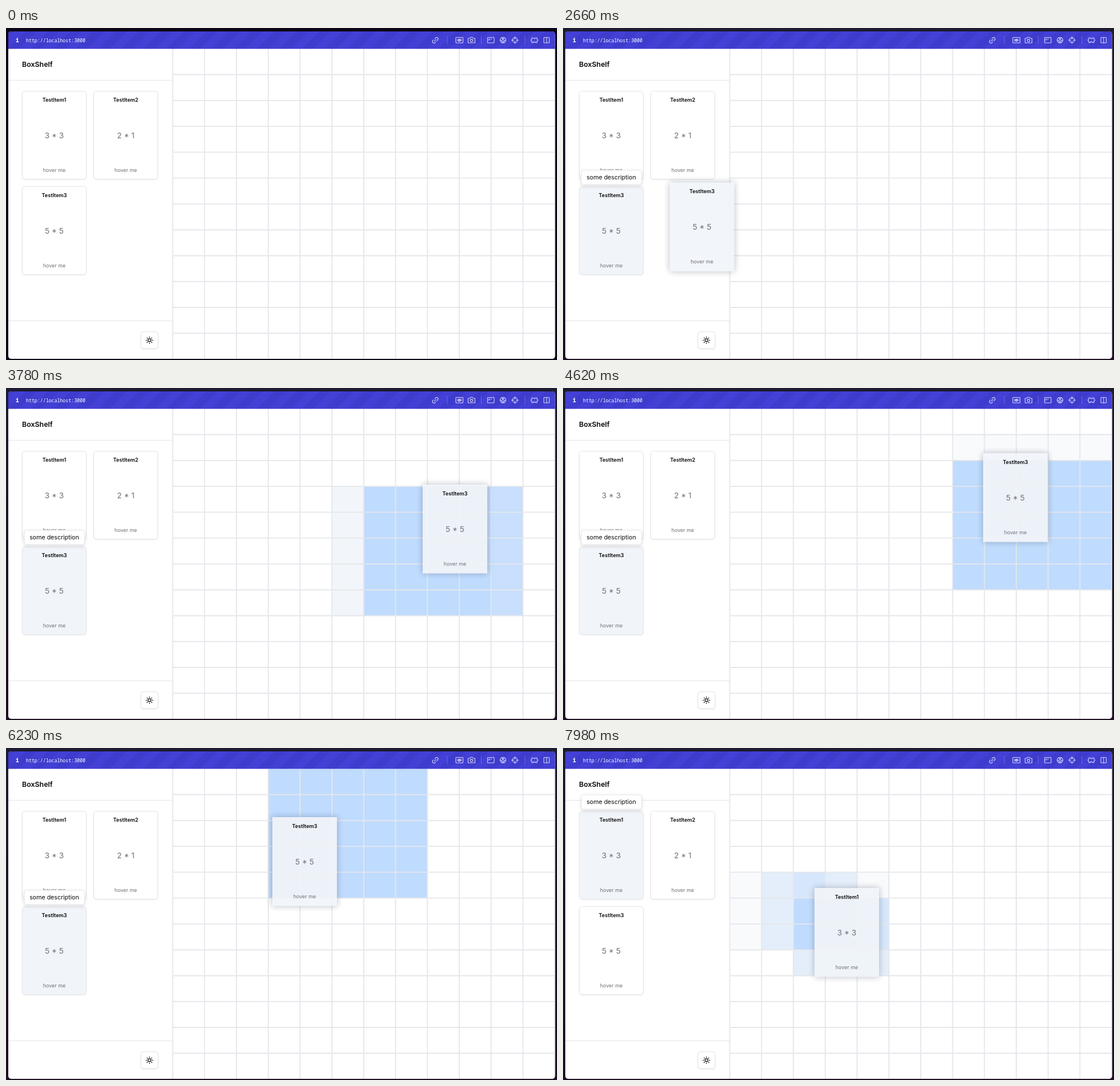
An HTML page for the animation above (8000 ms loop, 964 by 581 pixels).

```html
<!DOCTYPE html>
<html lang="en">
<head>
<meta charset="utf-8">
<title>BoxShelf</title>
<style>
html, body { margin: 0; width: 100%; height: 100%; overflow: hidden; background: #0c0714; }
svg { display: block; width: 964px; height: 581px; font-family: Inter, sans-serif; }
.mid { text-anchor: middle; }
.name { font-size: 9.1px; font-weight: 600; fill: #09090b; }
.size { font-size: 13.7px; fill: #71717a; }
.hint { font-size: 9px; fill: #71717a; }
.tip { font-size: 10.6px; fill: #09090b; }
.mono { font-family: "Noto Sans Mono", monospace; fill: #fff; }
.icons { fill: none; stroke: #d3d3fa; stroke-width: 1.1; stroke-linecap: round; stroke-linejoin: round; }
.soft { filter: drop-shadow(0 1px 1px rgba(0,0,0,.07)); }
.lift { filter: drop-shadow(0 0 6px rgba(15,23,42,.3)); }
.pop { filter: drop-shadow(0 2px 3px rgba(0,0,0,.13)); }
</style>
</head>
<body>
<svg id="stage" viewBox="0 0 964 581">
  <defs>
    <linearGradient id="desk" x2="0" y2="1">
      <stop stop-color="#1d1c30"/><stop offset="1" stop-color="#1d1022"/>
    </linearGradient>
    <pattern id="stripes" width="28" height="28" patternUnits="userSpaceOnUse" patternTransform="rotate(45)">
      <rect width="28" height="28" fill="#4340d5"/><rect width="14" height="28" fill="#3e3ccd"/>
    </pattern>
    <clipPath id="win"><rect x="4" y="6" width="956.5" height="573" rx="5"/></clipPath>
  </defs>
  <rect width="964" height="581" fill="#0c0714"/>
  <rect id="backdrop" width="964" height="581" fill="url(#desk)"/>
  <g clip-path="url(#win)">
    <rect x="4" y="6" width="957" height="573" fill="#fff"/>
    <g id="cells"></g>
    <path id="lines" stroke="#e5e7eb" stroke-width="1.9" fill="none"/>
    <path d="M4 91.5H291M4 512.5H291" stroke="#e4e4e7"/>
    <rect x="4" y="6" width="957" height="30.5" fill="url(#stripes)"/>
    <text class="mono mid" x="20" y="25" font-size="10.5" font-weight="700">i</text>
    <text class="mono" x="35" y="24.5" font-size="8.25">http://localhost:3000</text>
    <path d="M772 14v14M831.5 14v14M908 14v14" stroke="#6a69e2"/>
    <g class="icons">
      <g transform="rotate(-45 751 21.5)">
        <path d="M749.5 18.8h-1.7a2.7 2.7 0 0 0 0 5.4h1.7M752.5 18.8h1.7a2.7 2.7 0 0 1 0 5.4h-1.7M748.7 21.5h4.6"/>
      </g>
      <rect x="787" y="16.5" width="12.5" height="9.5" rx="1"/>
      <path d="M789.5 21.2q3.7-4 7.4 0q-3.7 4-7.4 0"/><circle cx="793.2" cy="21.2" r="1"/>
      <path d="M808.5 18h3l1.2-1.8h3.6l1.2 1.8h3v8h-12z"/><circle cx="814.5" cy="21.8" r="2.2"/>
      <rect x="842.5" y="16.5" width="11.5" height="9.5" rx="1"/><path d="M844.7 19l1.5 1.2-1.5 1.2M847.8 19h1.5"/>
      <circle cx="869.5" cy="21.2" r="5"/>
      <path d="M867 17l2.5 2 2.5-2M865 22l2.5-.5 1 3-1 1.5M874 22l-2.5-.5-1 3 1 1.5M869.5 19l-2 2.5M869.5 19l2 2.5M868.5 24.5h2"/>
      <circle cx="890.5" cy="21.2" r="4.3"/><path d="M890.5 15.2v4M890.5 23.2v4M884.5 21.2h4M892.5 21.2h4"/>
      <path d="M920 17.2h3a1.5 1.5 0 0 0 3 0h3v2.5a1.6 1.6 0 0 1 0 3.2v2.5h-3a1.5 1.5 0 0 0-3 0h-3v-2.5a1.6 1.6 0 0 1 0-3.2z"/>
      <rect x="941" y="16.5" width="9.5" height="9.5" rx="1"/><path d="M945.8 16.5v9.5"/>
    </g>
    <text x="28" y="68" font-size="12.4" font-weight="600" fill="#09090b">BoxShelf</text>
    <g id="shelf"></g>
    <rect class="soft" x="236" y="531.5" width="30" height="29.5" rx="4" fill="#fff" stroke="#e4e4e7"/>
    <g id="sun" fill="none" stroke="#09090b" stroke-width="1.2" stroke-linecap="round"><circle cx="251" cy="546.3" r="2.6"/></g>
    <g id="tips"></g>
    <g id="drag"></g>
  </g>
</svg>
<script>
const LOOP = 8000, STEP = 70;
const COLS = 12, ROWS = 12, CW = 55.7, CH = 45.27, GX = 291.9, GY = 36.5;
const GRAB = [60.5, 100.5];
const BLUE = [191, 219, 254], SLATE = [241, 245, 249], WHITE = [255, 255, 255];
const $ = id => document.getElementById(id);

function add(parent, tag, attrs, text) {
  const el = document.createElementNS("http://www.w3.org/2000/svg", tag);
  for (const k in attrs) el.setAttribute(k, attrs[k]);
  if (text) el.textContent = text;
  return parent.appendChild(el);
}
const clamp = (v, lo = 0, hi = 1) => Math.min(hi, Math.max(lo, v));
const mix = (a, b, k) => `rgb(${a.map((v, i) => Math.round(v + (b[i] - v) * k))})`;

const items = [
  { name: "TestItem1", size: "3 * 3", x: 28, y: 110 },
  { name: "TestItem2", size: "2 * 1", x: 153, y: 110 },
  { name: "TestItem3", size: "5 * 5", x: 28, y: 277 }
];

// Drags: time, left, top of the carried card
const drags = [
  { item: items[2], reach: 2, hold: 6090, drop: 6230, end: 6510, keys: [
    [2380, 28, 277], [2520, 60, 275], [2730, 250, 268], [2870, 380, 260], [2955, 437, 252],
    [2990, 455, 249], [3080, 472, 246], [3220, 488, 244], [3500, 600, 212], [3670, 677, 186],
    [3780, 729, 169], [3990, 743, 147], [4340, 743, 143], [4480, 741, 140], [4620, 735, 114],
    [4900, 742, 72], [5250, 744, 52], [5390, 730, 52], [5740, 610, 56], [6090, 515, 64],
    [6160, 512, 66], [6230, 466, 121], [6300, 300, 190], [6370, 140, 246], [6440, 60, 270], [6510, 28, 277]] },
  { item: items[0], reach: 1, hold: LOOP, drop: LOOP, end: LOOP, keys: [
    [7630, 28, 110], [7700, 80, 122], [7770, 230, 160], [7840, 345, 185], [7900, 396, 205], [7980, 440, 245]] }
];

function place(keys, t) {
  let i = 1;
  while (i < keys.length - 1 && keys[i][0] < t) i++;
  const [a, b] = [keys[i - 1], keys[i]];
  const k = clamp((t - a[0]) / (b[0] - a[0]));
  return [a[1] + (b[1] - a[1]) * k, a[2] + (b[2] - a[2]) * k];
}

function drawCard(parent, item, carried) {
  const g = add(parent, "g", { transform: `translate(${item.x} ${item.y})` });
  const box = add(g, "rect", carried
    ? { class: "lift", width: 113, height: 155.5, fill: "#f1f5f9", opacity: .92 }
    : { class: "soft", x: .5, y: .5, width: 112, height: 154, rx: 5, stroke: "#e4e4e7" });
  add(g, "text", { class: "mid name", x: 56.5, y: 19 }, item.name);
  add(g, "text", { class: "mid size", x: 56.5, y: 82.5 }, item.size);
  add(g, "text", { class: "mid hint", x: 56.5, y: 142 }, "hover me");
  return { g, box };
}

function drawTip(item) {
  const g = add($("tips"), "g", { transform: `translate(${item.x} ${item.y})` });
  add(g, "rect", { class: "pop", x: 4, y: -28, width: 105.5, height: 25, rx: 4, fill: "#fff", stroke: "#e4e4e7", "stroke-width": .8 });
  add(g, "text", { class: "mid tip", x: 56.5, y: -12 }, "some description");
  return g;
}

const shelf = items.map(item => drawCard($("shelf"), item));
const tips = items.map(drawTip);
for (const d of drags) d.card = drawCard($("drag"), d.item, true);

const cells = [];
for (let r = 0; r < ROWS; r++) for (let c = 0; c < COLS; c++)
  cells.push({ r, c, el: add($("cells"), "rect", { x: GX + c * CW, y: GY + r * CH, width: CW, height: CH }) });

let path = "";
for (let c = 0; c <= COLS; c++) path += `M${GX + c * CW - .2} 36V580`;
for (let r = 1; r < ROWS; r++) path += `M291 ${GY + r * CH - .2}H961`;
$("lines").setAttribute("d", path);

let rays = "";
for (let i = 0; i < 8; i++) {
  const a = i * Math.PI / 4, x = Math.cos(a), y = Math.sin(a);
  rays += `M${251 + 4.8 * x} ${546.3 + 4.8 * y}L${251 + 6 * x} ${546.3 + 6 * y}`;
}
add($("sun"), "path", { d: rays });

// Top-left cell and span of the drop zone at time t
function zone(t) {
  const d = drags.find(d => t >= d.keys[0][0] && t <= d.drop);
  if (!d) return null;
  const [x, y] = place(d.keys, Math.min(t, d.hold));
  const c = Math.floor((x + GRAB[0] - GX) / CW), r = Math.floor((y + GRAB[1] - GY) / CH);
  if (c < 0 || r < 0) return null;
  const n = d.reach * 2 + 1;
  return { c: clamp(c - d.reach, 0, COLS - n), r: clamp(r - d.reach, 0, ROWS - n), n };
}

function tint(v) {
  return v < .3 ? mix(WHITE, SLATE, v / .3) : mix(SLATE, BLUE, clamp((v - .3) / .5));
}

function draw(now) {
  const t = Math.floor(now % LOOP / STEP) * STEP;
  const ramp = start => clamp((t - start + STEP) / 140);

  $("backdrop").setAttribute("opacity", ramp(700));
  const hover = [ramp(6580), 0, ramp(700) - ramp(6510)];
  shelf.forEach((s, i) => s.box.setAttribute("fill", mix(WHITE, SLATE, hover[i])));

  const shown = [ramp(7630), 0, ramp(2380) - clamp((t - 7280) / 210)];
  tips.forEach((g, i) => g.setAttribute("opacity", clamp(shown[i])));

  for (const d of drags) {
    const on = t >= d.keys[0][0] && t < d.end;
    d.card.g.setAttribute("visibility", on ? "visible" : "hidden");
    if (on) d.card.g.setAttribute("transform", `translate(${place(d.keys, t)})`);
  }

  // Averaging the recent zones gives each cell its fade
  const recent = Array.from({ length: 7 }, (_, i) => zone(t - i * 25));
  for (const { r, c, el } of cells) {
    const hits = recent.filter(z => z && c >= z.c && c < z.c + z.n && r >= z.r && r < z.r + z.n);
    el.setAttribute("fill", tint(hits.length / 7));
  }
}

const begin = performance.now();
function tick() {
  draw(performance.now() - begin);
  requestAnimationFrame(tick);
}
tick();
</script>
</body>
</html>
```
